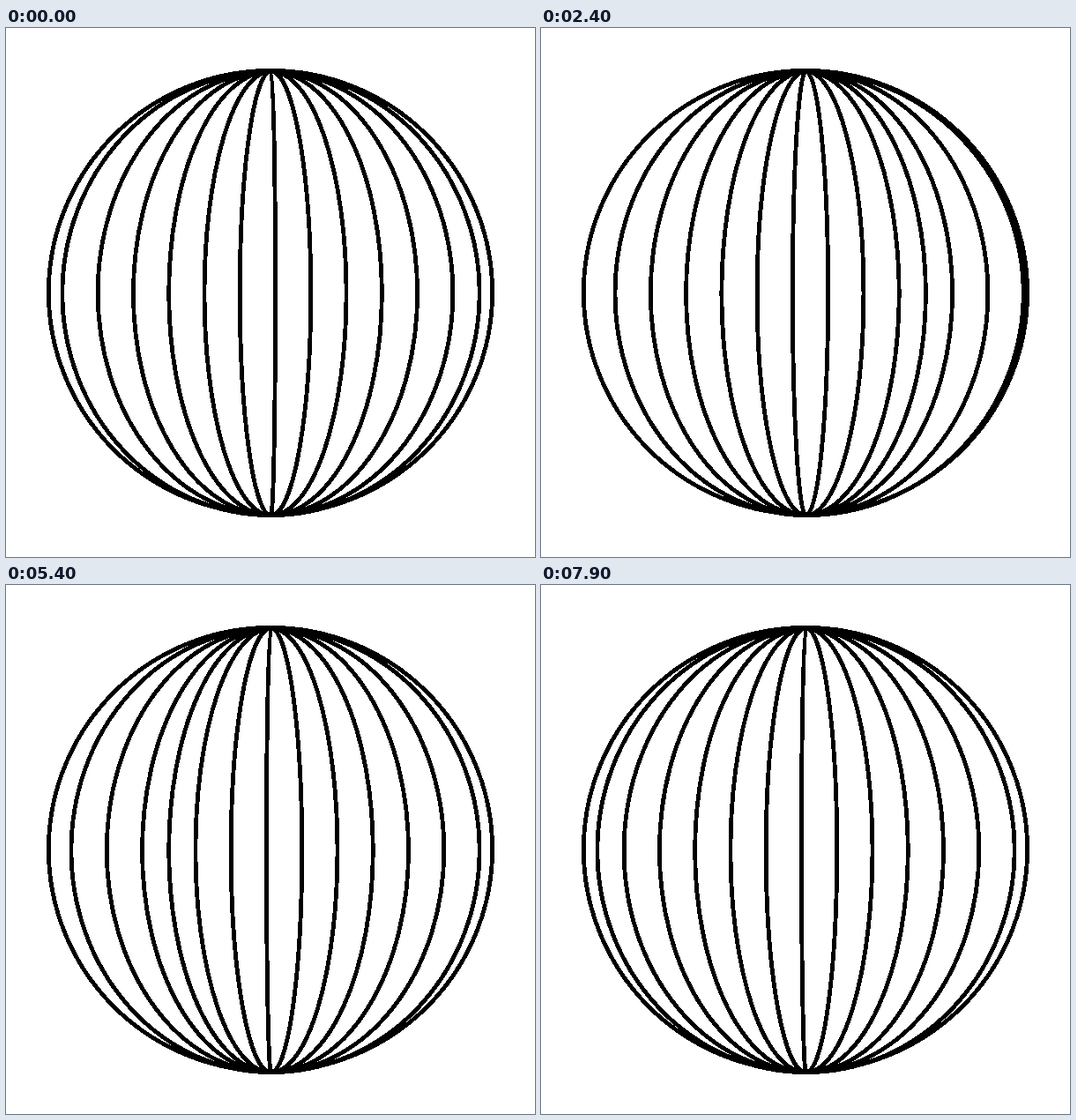
Animation, 600 px wide and 600 px high, one loop 8000 ms. Source, as an HTML page:

```html
<!DOCTYPE html>
<html lang="en">
<head>
<meta charset="utf-8">
<title>Turning globe</title>
<style>
  html, body { margin: 0; width: 100%; height: 100%; overflow: hidden; background: #fff; }
  svg { display: block; width: 100vw; height: 100vh; }
</style>
</head>
<body>
<svg viewBox="0 0 600 600" fill="none" stroke="#000" stroke-width="4.8" shape-rendering="crispEdges">
  <circle cx="300" cy="300" r="251.7"/>
  <path id="lines" transform="translate(300.5 301)"/>
</svg>
<script>
  const R = 251.7, SLOTS = 50, STEP_MS = 100, LOOP_MS = 8000;
  const lines = document.getElementById("lines");

  // Lines sit four slots apart, except for three on each side of the first one.
  const offsets = [0];
  for (let d = 3; d <= 23; d += 4) offsets.push(d, -d);

  // Half an ellipse from pole to pole, bulging by dx at the equator.
  function meridian(dx) {
    return `M0 ${-R}A${Math.abs(dx)} ${R} 0 0 ${dx > 0 ? 1 : 0} 0 ${R}`;
  }

  function draw(ms) {
    const step = Math.floor((ms % LOOP_MS) / STEP_MS);
    const shift = 48 - Math.floor(2.5 * step) % SLOTS;
    lines.setAttribute("d", offsets.map(d => {
      const slot = (shift + d + 2 * SLOTS) % SLOTS;
      return meridian((slot - 24.5) * R / 25);
    }).join(""));
  }

  const start = performance.now();
  function tick() {
    draw(performance.now() - start);
    requestAnimationFrame(tick);
  }
  tick();
</script>
</body>
</html>
```
